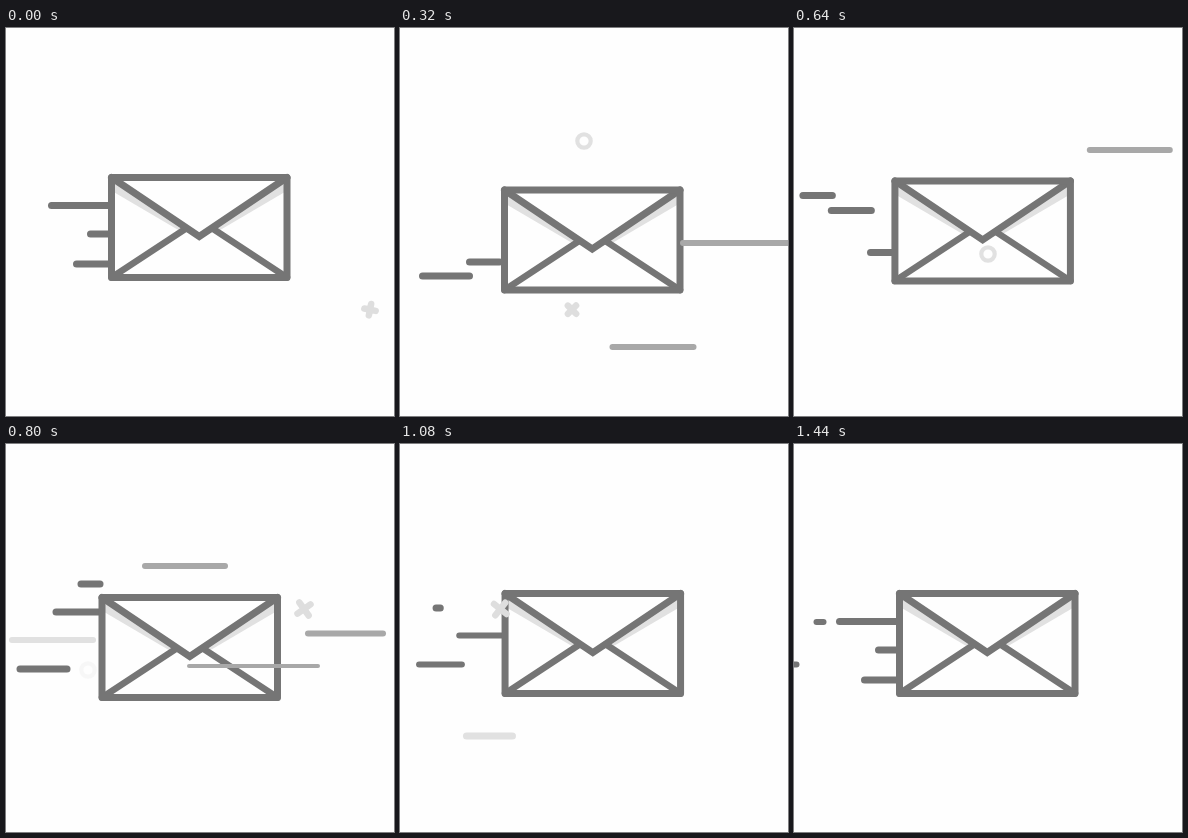
Recreate the animation shown at these times as an HTML page with a canvas. Size 388 by 388 pixels, loop 1520 ms.

```html
<!DOCTYPE html>
<html lang="en">
<head>
<meta charset="utf-8">
<title>Flying envelope</title>
<style>
  html, body { margin: 0; width: 100%; height: 100%; overflow: hidden; background: #fefefe; }
  canvas { display: block; width: 388px; height: 388px; }
</style>
</head>
<body>
<canvas id="stage" width="388" height="388"></canvas>
<script>
const ctx = document.getElementById('stage').getContext('2d');
const LOOP = 1520, STEP = 40, LAST = 1440;
const PAPER = '#fefefe', DARK = '#757575', MID = '#a8a8a8', PALE = '#e1e1e1';

// Envelope's top-left corner: time, x, y
const path = [
  [0, 105.5, 149.5], [320, 104.5, 162], [480, 107, 152.5], [800, 96, 153.5],
  [960, 105.5, 145.5], [1200, 103.5, 154], [1440, 105.5, 149.5]
];

// A streak runs left from start to end; head is its left tip at time at.
const streak = (y, at, head, length, speed, end, color = DARK, width = 7, start = 0) =>
  ({ y, at, head, length, speed, end, color, width, start });

const openers = at => [
  streak(28, at, -60, 60, .36, -92),
  streak(56.5, at, -21, 21, .36, -92),
  streak(86.5, at, -35, 35, .36, -92)
];

// Relative to the envelope, drawn behind it
const trail = [
  ...openers(0), ...openers(LAST),
  streak(86, 320, -82, 47, .36, -92),
  streak(72, 320, -35, 30, .36, -89),
  streak(14.5, 480, -53, 48, .36, -92),
  streak(29.5, 480, -6, 40, .36, -80),
  streak(-13.5, 800, -21, 48, .45, -92, DARK, 7, -2),
  streak(14.5, 800, -46, 82, .36, -69),
  streak(71.5, 800, -82, 47, .36, -91),
  streak(71, 960, -44, 44, .36, -86, DARK, 6),
  streak(42, 1200, -89, 80, .36, -92, DARK, 6),
  streak(28.5, 1440, -116, 40, .6, -83, DARK, 6),
  streak(71, 1440, -143, 40, .6, -108, DARK, 6),
  streak(42.5, 480, -107, 62, .7, -107, PALE, 6),
  streak(42.5, 800, -90, 81, .7, -92, PALE, 6),
  streak(71.5, 960, -105, 60, .7, -107, PALE, 6),
  streak(142.5, 1200, -89, 46, .42, -89, PALE, 7, 17),
  streak(157, 320, 108, 81, 1.06, -8, MID, 6, 400)
];

// Fixed to the stage, drawn in front
const passing = [
  streak(215, 320, 283, 139, 1.4, 73, MID, 6, 500),
  streak(122, 800, 139, 80, .98, 54, MID, 6, 500),
  streak(189.5, 800, 302, 75, 1.72, 51, MID, 6, 500),
  streak(222, 800, 183, 129, 1.65, 71, MID, 4, 500)
];

const clamp = (v, lo, hi) => Math.max(lo, Math.min(hi, v));

function spline(t, axis) {
  let i = 0;
  while (i < path.length - 2 && t > path[i + 1][0]) i++;
  const a = path[i], b = path[i + 1], span = b[0] - a[0], u = (t - a[0]) / span;
  const slope = k => {
    const p = path[Math.max(0, k - 1)], n = path[Math.min(path.length - 1, k + 1)];
    return (n[axis] - p[axis]) / (n[0] - p[0]) * span;
  };
  const u2 = u * u, u3 = u2 * u;
  return (2 * u3 - 3 * u2 + 1) * a[axis] + (u3 - 2 * u2 + u) * slope(i) +
    (3 * u2 - 2 * u3) * b[axis] + (u3 - u2) * slope(i + 1);
}

function line(points, color, width) {
  ctx.beginPath();
  points.forEach(([x, y]) => ctx.lineTo(x, y));
  ctx.strokeStyle = color;
  ctx.lineWidth = width;
  ctx.stroke();
}

function fill(points, color) {
  ctx.beginPath();
  points.forEach(([x, y]) => ctx.lineTo(x, y));
  ctx.fillStyle = color;
  ctx.fill();
}

function drawStreak(s, t) {
  const tip = s.head - s.speed * (t - s.at);
  const left = Math.max(s.end, tip), right = Math.min(s.start, tip + s.length);
  if (right > left) line([[left, s.y], [right, s.y]], s.color, s.width);
}

function drawEnvelope() {
  const w = 175.5, h = 100, mid = w / 2;
  fill([[0, 0], [w, 0], [w, h], [0, h]], PAPER);
  fill([[0, 0], [3, 15], [66, 52], [mid, 59]], PALE);
  fill([[w, 0], [w - 3, 15], [w - 66, 52], [mid, 59]], PALE);
  line([[0, h], [73, 52]], DARK, 6.5);
  line([[w, h], [w - 73, 52]], DARK, 6.5);
  ctx.lineJoin = 'miter';
  line([[0, 0], [mid, 59]].concat([[w, 0]]), DARK, 7);
  ctx.lineJoin = 'round';
  ctx.beginPath();
  ctx.rect(0, 0, w, h);
  ctx.lineWidth = 7;
  ctx.stroke();
}

function drawRing(x, y) {
  ctx.globalAlpha = clamp((x - 60) / 100, 0, 1);
  ctx.beginPath();
  ctx.arc(x, y, 6.7, 0, Math.PI * 2);
  ctx.strokeStyle = PALE;
  ctx.lineWidth = 4.2;
  ctx.stroke();
  ctx.globalAlpha = 1;
}

function drawCross(x, y, arm, angle) {
  ctx.save();
  ctx.globalAlpha = clamp((x - 30) / 60, 0, 1);
  ctx.translate(x, y);
  ctx.rotate(angle);
  ctx.beginPath();
  ctx.moveTo(-arm, 0);
  ctx.lineTo(arm, 0);
  ctx.moveTo(0, -arm);
  ctx.lineTo(0, arm);
  ctx.strokeStyle = '#dedede';
  ctx.lineWidth = 6.5;
  ctx.stroke();
  ctx.restore();
}

function draw(t) {
  ctx.fillStyle = PAPER;
  ctx.fillRect(0, 0, 388, 388);
  ctx.lineCap = ctx.lineJoin = 'round';

  ctx.save();
  ctx.translate(spline(t, 1), spline(t, 2));
  trail.forEach(s => drawStreak(s, t));
  drawEnvelope();
  ctx.restore();

  passing.forEach(s => drawStreak(s, t));
  drawRing(184 - .725 * (t - 320), 113);
  drawRing(306 - .7 * (t - 480), 226);
  drawCross(364 - .6 * t, 281.7, 5.8, .2 + t * .0018);
  drawCross(298 - .706 * (t - 800), 165, 8, .95 - (t - 800) * .001);
}

function tick(now) {
  const t = Math.floor(now % LOOP / STEP) * STEP;
  draw(Math.min(t, LAST));
  requestAnimationFrame(tick);
}
draw(0);
requestAnimationFrame(tick);
</script>
</body>
</html>
```
